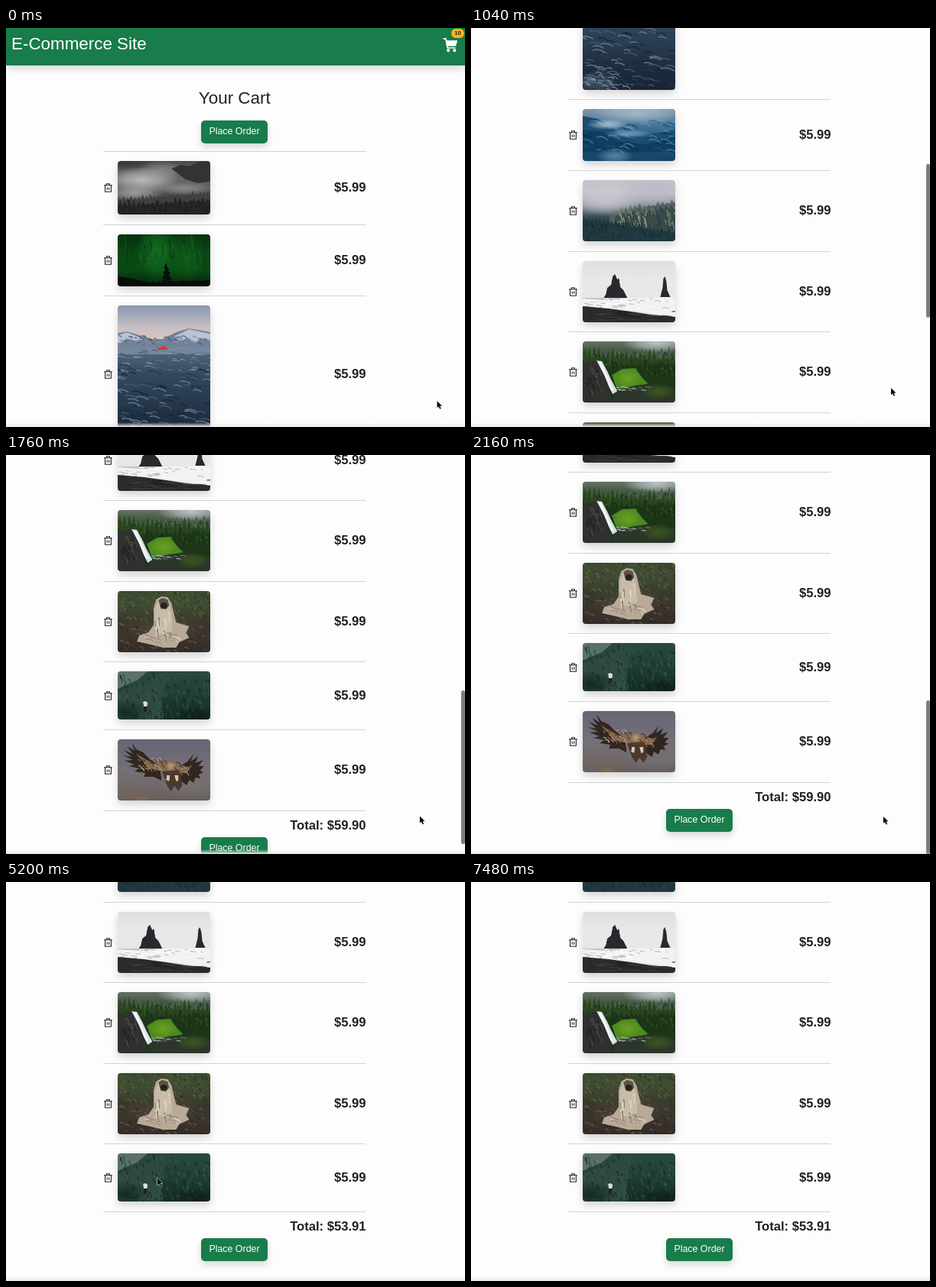
Recreate the animation shown at these times as an HTML page with a canvas. Size 600 by 522 pixels, loop 7520 ms.

```html
<!DOCTYPE html>
<html lang="en">
<head>
<meta charset="utf-8">
<title>Cart</title>
<style>
html, body { margin: 0; width: 600px; height: 522px; overflow: hidden; background: #fefdfe; }
body { position: relative; font-family: "Liberation Sans", Helvetica, Arial, sans-serif; color: #1d2125; }
#page, #page > *, #foot > *, #thumb, #edge, #arrow, #hand { position: absolute; }
#page { left: 0; top: 0; width: 600px; height: 1356px; }
header { left: 0; top: 0; width: 600px; height: 49px; background: #187c4b; box-shadow: 0 4px 11px rgba(0,0,0,.16); }
header * { position: absolute; }
header b { left: 7px; top: 6px; font: 22.4px/29px "Liberation Sans", Arial, sans-serif; color: #fff; white-space: nowrap; }
#badge { left: 582px; top: 1px; width: 17px; height: 12px; border-radius: 6px; background: #fdb714; font: bold 7.5px/12px "Liberation Sans", Arial, sans-serif; text-align: center; color: #222; }
h1 { left: 0; top: 78px; width: 597.5px; margin: 0; font: 22.4px/28px "Liberation Sans", Arial, sans-serif; text-align: center; }
.btn { left: 255px; width: 87px; height: 30px; border-radius: 5px; background: #187c4b; color: #fff; font-size: 12.4px; line-height: 29px; text-align: center; box-shadow: 0 5px 10px rgba(0,0,0,.15); }
.line { left: 127px; width: 343px; height: 1px; background: #d3d2d5; }
.sum { right: 129.5px; height: 20px; font-weight: bold; font-size: 16.6px; line-height: 20px; white-space: nowrap; }
canvas { left: 146px; width: 120.7px; border-radius: 4px; box-shadow: 0 5px 11px rgba(0,0,0,.17); }
.bin { left: 128px; width: 11px; height: 12px; }
.bin.on .body { fill: #1d2125; }
.bin.on .bars { stroke: #fff; }
#foot { left: 0; top: 0; width: 600px; }
#thumb { left: 595px; top: 0; width: 4.5px; border-radius: 2.5px; background: #7d7d7e; }
#edge { left: 0; bottom: 0; width: 600px; height: 6px; background: linear-gradient(rgba(228,228,228,0), #e9e9e9); }
#arrow, #hand { left: 0; top: 0; overflow: visible; }
</style>
</head>
<body>
<div id="page">
  <header>
    <b>E-Commerce Site</b>
    <svg style="left:571px;top:13px" width="20" height="19" fill="none" stroke="#fff" stroke-width="1.7">
      <path d="M.5 1.2H4L6.2 13H16.5"/>
      <path d="M4.5 4H18L16.5 10H5.6Z" fill="#fff"/>
      <circle cx="7.2" cy="16.3" r="1.3" fill="#fff"/><circle cx="15.3" cy="16.3" r="1.3" fill="#fff"/>
    </svg>
    <span id="badge">10</span>
  </header>
  <h1>Your Cart</h1>
  <div class="btn" style="top:121px">Place Order</div>
  <div id="foot">
    <div class="line" style="top:1265px"></div>
    <div class="sum" id="total" style="top:1275px"></div>
    <div class="btn" style="top:1300px">Place Order</div>
  </div>
</div>
<div id="edge"></div>
<div id="thumb"></div>
<svg id="arrow" width="10" height="14"><path d="M0 0V9L2 7.2 3.6 10.6 5.2 9.9 3.7 6.6H6.6Z" fill="#0c0c0c" stroke="#fff" stroke-width=".9" paint-order="stroke"/></svg>
<svg id="hand" width="12" height="14"><path d="M-1 1Q0-.8 1 1V4.2Q2.3 3.2 3 4.6 4.4 3.8 5 5.4 6 5.2 6 6.6 6 9.4 4.8 11H-.2Q-1.5 9-3 7-3.2 5.4-1 6.4Z" fill="#fff" stroke="#111" stroke-width=".9"/></svg>
<script>
const LOOP = 7520, W = 120.7, VIEW = 522, PAGE = 1356, REMOVE = 4080, STEP = 106;
const $ = id => document.getElementById(id);

let seed = 1;
const rand = (a = 0, b = 1) => {
  seed = (seed * 16807) % 2147483647;
  return a + (b - a) * seed / 2147483647;
};

// Painting helpers
let c, H;
function wash(...colors) {
  const g = c.createLinearGradient(0, 0, 0, H);
  colors.forEach((k, i) => g.addColorStop(i / (colors.length - 1), k));
  c.fillStyle = g;
  c.fillRect(0, 0, W, H);
}
function poly(fill, pts) {
  c.fillStyle = fill;
  c.fill(new Path2D("M" + pts + "Z"));
}
function blob(x, y, rx, ry, rgb, a = 1) {
  c.save();
  c.translate(x, y);
  c.scale(rx, ry);
  const g = c.createRadialGradient(0, 0, 0, 0, 0, 1);
  g.addColorStop(0, `rgba(${rgb},${a})`);
  g.addColorStop(.5, `rgba(${rgb},${a * .6})`);
  g.addColorStop(1, `rgba(${rgb},0)`);
  c.fillStyle = g;
  c.fillRect(-1, -1, 2, 2);
  c.restore();
}
function ridge(fill, y0, y1, amp, gap, x0 = 0, x1 = W) {
  c.fillStyle = fill;
  c.beginPath();
  c.moveTo(x0, H);
  for (let x = x0; x <= x1 + gap; x += gap) {
    const y = y0 + (y1 - y0) * (x - x0) / (x1 - x0);
    c.lineTo(x, y);
    c.lineTo(x + gap / 2, y - rand(.2, 1) * amp);
  }
  c.lineTo(x1, H);
  c.fill();
}
function strokes(n, x, y, w, h, dx, dy, colors, thick = 1) {
  c.lineWidth = thick;
  for (let i = 0; i < n; i++) {
    const px = x + rand() * w, py = y + rand() * h, s = rand(.4, 1);
    c.strokeStyle = colors[i % colors.length];
    c.beginPath();
    c.moveTo(px, py);
    c.quadraticCurveTo(px + dx * s / 2, py - dy * s, px + dx * s, py + dy * s);
    c.stroke();
  }
}

function fog() {
  wash("#4a4a4a", "#696969", "#474747", "#1d1d1d");
  blob(32, 25, 48, 17, "190,190,190", .95);
  blob(22, 42, 40, 11, "175,175,175", .8);
  blob(86, 36, 42, 9, "150,150,150", .8);
  blob(58, 12, 34, 12, "160,160,160", .6);
  poly("#333333", "70 10L82 5 94 7 106 1 121 0V27L104 29 88 24Z");
  blob(10, 0, 36, 12, "50,50,50", .9);
  ridge("#404040", 53, 44, 8, 5);
  ridge("#242424", 60, 53, 10, 6);
  strokes(80, 0, 52, W, 18, 0, 3, ["#1a1a1a", "#333333"]);
}
function aurora() {
  wash("#08300e", "#0a4715", "#0b4a15", "#04250a");
  blob(52, 22, 28, 40, "20,118,34", .8);
  blob(88, 30, 30, 36, "14,92,26", .75);
  strokes(50, 8, 2, 105, 36, 2, 13, ["rgba(25,130,42,.23)", "rgba(3,35,8,.26)"], 2);
  poly("#080d09", "0 55L20 58 48 64 85 65 121 59V68H0Z");
  ridge("#070b08", 66, 61, 4, 4);
  poly("#071009", "63 37L65 44 67 45 65.5 48 69 51 66 53 70 58 67 59 71 65H56L60 58 58 56 61 52 59 50 62 47 60 44Z");
}
function fjord() {
  wash("#8394ae", "#c5bec4", "#52677e", "#34485e", "#293c51", "#1e2d3f", "#182534");
  c.fillStyle = (() => {
    const g = c.createLinearGradient(0, 0, 0, 56);
    g.addColorStop(0, "#8898b0");
    g.addColorStop(.5, "#c6bec4");
    g.addColorStop(1, "#ebcbb9");
    return g;
  })();
  c.fillRect(0, 0, W, 55);
  poly("#71819a", "0 36L12 34 26 38 40 44 58 44 76 35 92 30 105 32 121 35V55H0Z");
  poly("#b9c3d2", "0 39L12 35 22 39 33 44 23 46 12 43 4 49 0 49ZM74 40L93 31 106 34 121 37V46L108 43 100 49 92 42 82 46Z");
  strokes(45, 0, 40, W, 10, 8, 3, ["#485870", "#8794a8"]);
  c.fillStyle = "#74879d";
  c.fillRect(0, 54, W, 10);
  strokes(70, -6, 56, 128, 29, 13, 1.3, ["#8294a8", "#435971", "#60768d"]);
  strokes(125, -8, 78, 130, 98, 18, 3.2, ["#17273a", "#40576f", "#263a50", "#617489"], 1.5);
  blob(18, 170, 28, 16, "128,148,164", .45);
  strokes(45, 0, 157, 55, 22, 10, 3, ["#8395a6", "#213349"]);
  poly("#c54136", "51 55H66L64 58H53ZM57 53H62V56H57Z");
}
function wave() {
  wash("#8097a8", "#527d9d", "#28618b", "#164a70", "#174666");
  blob(70, 5, 60, 15, "180,198,209", .75);
  poly("#194c70", "0 9L20 13 38 24 51 36 72 35 121 27V47L70 55 0 52Z");
  poly("#103d5f", "0 27L23 29 49 43 82 46 121 37V56H0Z");
  strokes(70, -5, 15, 125, 43, 17, 4, ["rgba(115,163,193,.55)", "rgba(8,48,78,.6)", "rgba(32,97,140,.6)"], 1.4);
  blob(32, 20, 28, 7, "190,211,222", .8);
  blob(60, 32, 32, 6, "142,177,199", .7);
  blob(42, 61, 25, 10, "121,167,196", .65);
}
function cliff() {
  wash("#c5c2cc", "#c8c5ce", "#8e959e", "#384d54", "#1c3039", "#15242d");
  ridge("#52615f", 43, 30, 9, 6, 35);
  ridge("#394b49", 50, 37, 9, 7, 42);
  strokes(55, 44, 36, 75, 25, 3, 8, ["#75806f", "#2a3c40", "#8a9183"]);
  blob(30, 26, 50, 21, "204,202,210", .9);
  blob(92, 14, 46, 20, "184,183,195", .8);
  ridge("#203740", 52, 70, 6, 5);
  strokes(65, 0, 55, W, 24, 3, 5, ["#162830", "#294249"]);
}
function rocks() {
  wash("#dfe0e1", "#e8e9e9", "#e7e7e8", "#cfd1d2");
  poly("#28292c", "26 50L30 44 32 35 37 31 39 20 42 17 45 24 47 22 49 34 53 38 58 48 56 52Z");
  poly("#28292c", "101 47L104 35 105 23 107 20 109 27 110 38 114 47Z");
  c.fillStyle = "#c2c5c7";
  c.fillRect(0, 48, W, 5);
  poly("#f1f2f2", "0 49L30 51 60 48 121 47V73L70 66 0 61Z");
  strokes(50, 0, 49, W, 13, 9, 1, ["#b4b7b9", "#ffffff"]);
  poly("#2b2b2e", "0 59L34 62 63 66 88 70 121 73V80H0Z");
  strokes(24, 0, 66, W, 12, 20, 1, ["#414145", "#202022"]);
}
function falls() {
  wash("#657267", "#334b2b", "#28441f", "#263d1e", "#17241a");
  blob(96, 2, 45, 14, "190,200,203", .95);
  ridge("#4b5e4e", 19, 15, 11, 5);
  ridge("#29451f", 22, 25, 17, 6);
  ridge("#1c3518", 34, 32, 12, 6);
  strokes(120, 0, 15, W, 30, 2, 4, ["#365b26", "#15270f", "#284a1d"]);
  poly("#30302e", "0 29L18 25 25 37 36 67 38 80H0Z");
  strokes(28, 0, 35, 25, 40, 3, 7, ["#1b2420", "#4a4642"]);
  poly("#4d8a20", "38 44L52 36 68 35 78 48 85 55 60 62 44 61Z");
  blob(59, 48, 17, 12, "112,165,35", .8);
  poly("#2b3529", "42 64L67 58 82 56 121 62V80H38Z");
  blob(98, 66, 24, 11, "58,91,30", .9);
  poly("#d7e0e7", "18 25L25 26 32 39 37 50 45 65 39 69 34 59 28 44Z");
  poly("#f4f7f9", "20 26L24 27 32 45 40 64 37 64 29 46Z");
  strokes(15, 44, 59, 38, 5, 8, 1, ["#b4bec1", "#6d7975"]);
}
function blanket() {
  wash("#3d4b32", "#414b32", "#39392c", "#3d352e", "#332c28");
  strokes(150, 0, 0, W, 45, 4, 3, ["#536340", "#2a3825", "#475935"], 1.4);
  blob(60, 48, 54, 20, "82,70,59", .7);
  strokes(85, 0, 46, W, 34, 5, 2, ["#292622", "#665648", "#494036"], 1.3);
  poly("#b8aa97", "47 22L50 11 57 7 65 8 70 16 73 29 76 41 93 46 89 55 93 61 80 67 76 74 59 74 43 70 25 66 28 58 40 54 47 44Z");
  poly("#c8bca9", "49 23L54 10 65 10 70 29 71 52 54 57 48 43Z");
  poly("#5e5046", "53 12L58 9 65 11 67 19 63 24 56 23Z");
  c.fillStyle = "#272322";
  c.beginPath();
  c.ellipse(60, 19, 4.5, 4, 0, 0, 7);
  c.fill();
  strokes(12, 46, 29, 22, 30, 2, 13, ["#867a6b", "#e0d4c3"]);
  strokes(18, 30, 53, 47, 15, 13, 4, ["#8e7d70", "#ddd0be", "#a38a7d"]);
}
function woods() {
  wash("#2b4a40", "#234238", "#1c382d", "#142b24");
  poly("#5b7067", "0 0H39L25 12 0 23Z");
  ridge("#30493e", 27, 9, 7, 6, 0, 55);
  strokes(210, 0, 4, W, 58, 3, 5, ["#2c5143", "#142c23", "#234439", "#345648"], 1.2);
  blob(10, 54, 30, 17, "18,37,31", .85);
  blob(104, 58, 32, 14, "12,29,23", .8);
  poly("#d9dfdc", "33 40L36 39 39 41 38 46 34 46Z");
  poly("#1b2221", "34 46H38L37 53H34Z");
}
function bird() {
  wash("#686675", "#6d6b78", "#757078", "#716a6b", "#665e5c");
  blob(22, 70, 40, 15, "119,103,92", .6);
  blob(95, 62, 40, 18, "126,120,121", .5);
  poly("#302620", "55 35L42 26 33 17 24 13 18 4 22 15 12 9 20 19 8 14 18 23 7 21 20 27 9 28 22 33 14 35 28 38 22 42 36 44 34 49 47 49 57 54Z");
  poly("#302620", "78 37L91 29 99 19 95 29 105 22 101 31 111 27 105 35 112 35 107 41 112 43 105 46 108 51 101 50 99 57 93 53 90 60 80 53Z");
  poly("#84684f", "23 18L36 26 48 32 63 28 76 29 83 38 97 34 90 44 75 44 61 43 42 38Z");
  strokes(55, 24, 24, 70, 22, 6, 4, ["#98795b", "#463427", "#bca078"]);
  poly("#4c392d", "58 42L80 40 84 60 79 68 74 61 69 68 64 60Z");
  blob(69, 35, 7, 7, "184,158,127", .9);
  poly("#d8c7b3", "64 47L68 47 67 55 63 53ZM74 47L79 47 79 54 76 55Z");
  blob(31, 79, 12, 6, "137,108,70", .9);
}

const paints = [fog, aurora, fjord, wave, cliff, rocks, falls, blanket, woods, bird];
const heights = [70.3, 68, 179.6, 67.7, 80, 80, 80, 80, 63, 80];
const page = $("page");

function add(tag, cls, top, html = "") {
  const el = document.createElement(tag);
  el.className = cls;
  el.style.top = top + "px";
  el.innerHTML = html;
  page.append(el);
  return el;
}

const binIcon = `<svg width="11" height="12" style="display:block" fill="none" stroke="#1d2125" stroke-width="1.1">
<path class="body" d="M1.6 3V11.2H9.4V3"/><path d="M0 2.7H11M3.6 2.5V.7H7.4V2.5"/><path class="bars" d="M4.3 5.4V8.8M6.7 5.4V8.8"/></svg>`;

let top0 = 173.8;
const rows = heights.map((h, i) => {
  const mid = top0 + h / 2;
  const line = add("div", "line", Math.round(top0 - 13));
  const photo = add("canvas", "", top0);
  photo.width = W * 2;
  photo.height = h * 2;
  photo.style.height = h + "px";
  c = photo.getContext("2d");
  c.scale(2, 2);
  H = h;
  seed = 911 + i * 377;
  paints[i]();
  const bin = add("div", "bin", Math.round(mid - 6), binIcon);
  const price = add("div", "sum", Math.round(mid - 10), "$5.99");
  top0 += h + 25.5;
  return { bin, mid, parts: [line, photo, bin, price] };
});

// Monotone cubic through [time, value] steps
function track(steps) {
  const rate = i => (steps[i + 1][1] - steps[i][1]) / (steps[i + 1][0] - steps[i][0]);
  const slope = steps.map((_, i) => {
    if (!i || i === steps.length - 1) return 0;
    const a = rate(i - 1), b = rate(i);
    return a * b > 0 ? 2 * a * b / (a + b) : 0;
  });
  return t => {
    const i = steps.findIndex(s => s[0] > t) - 1;
    if (i < -1) return steps.at(-1)[1];
    const [t0, a] = steps[i], [t1, b] = steps[i + 1], d = t1 - t0, u = (t - t0) / d;
    const k = u * u * (3 - 2 * u);
    return a + (b - a) * k + d * u * (1 - u) * (slope[i] * (1 - u) - slope[i + 1] * u);
  };
}

const scrollAt = track([[0, 0], [160, 0], [440, 80], [720, 250], [1060, 474], [1400, 661], [1760, 800], [2000, 842], [2160, 837], [2320, 834]]);
const xAt = track([[0, 563.5], [360, 549], [1400, 549], [1900, 539], [2360, 539], [3060, 135], [4300, 135], [4900, 198]]);
const yAt = track([[0, 488], [360, 471], [1400, 471], [1900, 473], [2360, 473], [3060, 384], [4300, 384], [4900, 387.5]]);

function draw(t) {
  const gone = t >= REMOVE;
  const scroll = Math.round(scrollAt(t)) - (gone ? STEP : 0);
  const x = xAt(t), y = yAt(t);
  page.style.transform = `translateY(${-scroll}px)`;
  $("foot").style.transform = `translateY(${gone ? -STEP : 0}px)`;
  $("total").textContent = "Total: $" + (gone ? "53.91" : "59.90");
  $("badge").textContent = gone ? 9 : 10;
  for (const el of rows[9].parts) el.style.visibility = gone ? "hidden" : "visible";

  let over = false;
  rows.forEach((r, i) => {
    const hit = !(gone && i === 9) && x > 126 && x < 140 && Math.abs(y - r.mid + scroll) < 8;
    r.bin.classList.toggle("on", hit);
    over = over || hit;
  });
  const shown = t < 6400;
  for (const [id, on] of [["arrow", shown && !over], ["hand", shown && over]]) {
    $(id).style.visibility = on ? "visible" : "hidden";
    $(id).style.transform = `translate(${x}px,${y}px)`;
  }

  const size = VIEW / PAGE;
  $("thumb").style.height = VIEW * size + "px";
  $("thumb").style.transform = `translateY(${Math.min(scroll, PAGE - VIEW) * size}px)`;
  $("thumb").style.opacity = t < 160 ? 0 : Math.max(0, Math.min(1, (2840 - t) / 240));
}

const start = performance.now();
function tick() {
  draw((performance.now() - start) % LOOP);
  requestAnimationFrame(tick);
}
draw(0);
requestAnimationFrame(tick);
</script>
</body>
</html>
```
